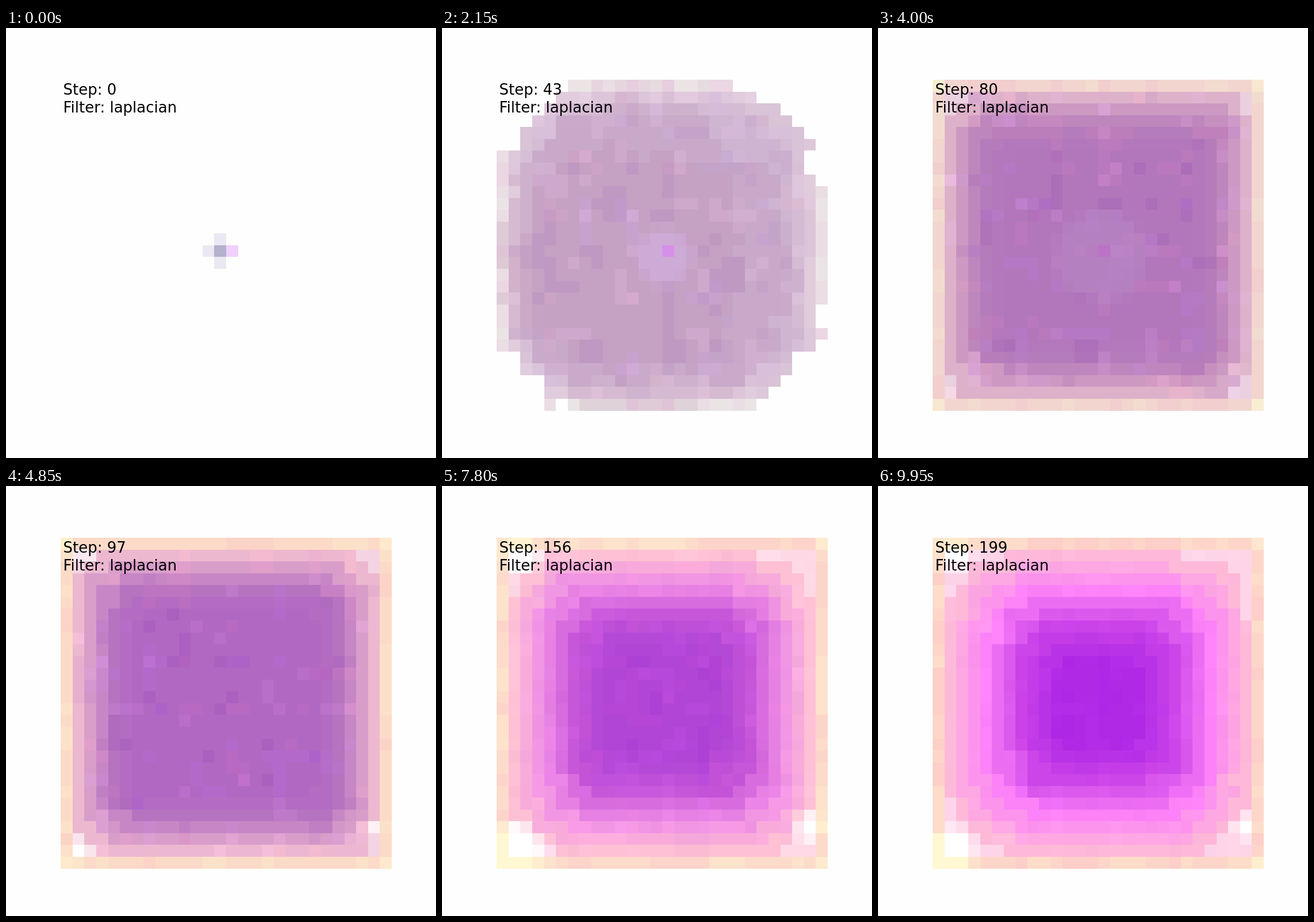
Recreate the animation shown at these times as an HTML page with a canvas. Size 748x748 px, loop 10000 ms.

```html
<!DOCTYPE html>
<html lang="en">
<head>
<meta charset="utf-8">
<title>Cellular growth</title>
<style>
  html, body { margin: 0; width: 100%; height: 100%; overflow: hidden; background: #fefefe; }
  canvas, svg { position: absolute; left: 0; top: 0; width: 748px; height: 748px; }
  text { font: 26px "DejaVu Sans", sans-serif; white-space: pre; }
</style>
</head>
<body>
<canvas id="stage" width="748" height="748"></canvas>
<svg viewBox="0 0 748 748">
  <text id="step" x="99.5" y="116">Step: 0</text>
  <text x="99.5" y="147">Filter: laplacian</text>
</svg>
<script>
const ctx = document.getElementById('stage').getContext('2d');
const label = document.getElementById('step');
const SIZE = 28, LAST = SIZE - 1, MID = LAST / 2;
const STEPS = 200, STEP_MS = 50, CELL = 575.5 / SIZE;

const rgb = hex => [1, 3, 5].map(i => parseInt(hex.slice(i, i + 2), 16));
const clamp = (v, lo = 0, hi = 1) => Math.max(lo, Math.min(hi, v));
const lerp = (a, b, k) => a + (b - a) * k;
const mix = (a, b, k) => a.map((v, i) => lerp(v, b[i], k));
const shift = (c, d, k) => c.map((v, i) => v + d[i] * k);
const ease = (from, to, s) => clamp((s - from) / (to - from));
const onEdge = v => v === 0 || v === LAST;

function gradient(list, at) {
  const v = clamp(at, 0, list.length - 1), i = Math.min(Math.floor(v), list.length - 2);
  return mix(list[i], list[i + 1], v - i);
}

// p: squareness of the rings, gap: rings between two colours, amp: grain.
const stage = (at, p, gap, amp, edge, ...rings) =>
  ({ at, p, gap, amp, edge: rgb(edge), rings: rings.map(rgb) });
const stages = [
  stage(64, 8, 1, .8, '#e8d1d6', '#d0abc5', '#bf95b9', '#b486b5', '#b384b5'),
  stage(97, 8, 1.5, .65, '#fcdac8', '#ecb8cf', '#cf90c8', '#b673c0', '#b168c2'),
  stage(122, 5.6, 2, .45, '#fde0c8', '#fdc4d0', '#d787d0', '#bf67cc', '#b05acb'),
  stage(156, 5, 2.5, .35, '#fddbcb', '#fec0d4', '#ee8ce5', '#c757d9', '#b145d6'),
  stage(199, 4.2, 3, .25, '#fdd6c9', '#feb9d9', '#fb82f7', '#cc45e9', '#b02ae5')
];
const young = ['#ede6ee', '#e5d8e6', '#d9c6da', '#d3b7d0'].map(rgb);
const spark = ['#f0d0ff', '#e9aeff', '#c069cc'].map(rgb);
const glow = ['#dfc7e6', '#b787c3'].map(rgb);
const seed = rgb('#b3b1cb'), bud = rgb('#ebe8f3');
const white = rgb('#ffffff'), cream = rgb('#fff8d2');

// Bleached corners and how wide they get.
const pockets = [{ x: 1, y: 26, r: 3.2 }, { x: 1.5, y: 1, r: 2.2 }, { x: 26, y: 24, r: 1.8 }];

function hash(x, y, z) {
  let h = Math.imul(x, 374761393) ^ Math.imul(y, 668265263) ^ Math.imul(z, 2147389327);
  h = Math.imul(h ^ (h >>> 13), 1274126177);
  h = Math.imul(h ^ (h >>> 15), 2246822519);
  return ((h ^ (h >>> 16)) >>> 0) / 2147483648 - 1;
}

// Smooth noise over the grid and time, in -1..1.
function noise(x, y, z) {
  const [i, j, k] = [x, y, z].map(Math.floor);
  const [u, v, w] = [x - i, y - j, z - k].map(f => f * f * (3 - 2 * f));
  const row = (b, c) => lerp(hash(i, b, c), hash(i + 1, b, c), u);
  const plane = c => lerp(row(j, c), row(j + 1, c), v);
  return lerp(plane(k), plane(k + 1), w);
}

function ringColour(st, x, y, n) {
  if (onEdge(x) || onEdge(y)) {
    return onEdge(x) && onEdge(y) ? mix(st.edge, cream, .5) : st.edge;
  }
  const dx = Math.abs(x - MID), dy = Math.abs(y - MID);
  const depth = Math.floor(14 - (dx ** st.p + dy ** st.p) ** (1 / st.p) + n * .35);
  return depth < 1 ? mix(st.rings[0], white, .4) : gradient(st.rings, (depth - 1) / st.gap);
}

function matureColour(x, y, s, n) {
  const i = Math.max(1, stages.findIndex(st => st.at >= s));
  const a = stages[i - 1], b = stages[i], k = ease(a.at, b.at, s);
  return {
    colour: mix(ringColour(a, x, y, n), ringColour(b, x, y, n), k),
    amp: lerp(a.amp, b.amp, k)
  };
}

// A dark core left of the seed spreads through the young tissue.
function youngLevel(x, y, s, age, n) {
  if (age < 5) return 0;
  const d = Math.hypot(x - 10.5, y - 15) + n * 1.8;
  return 1 + (d < (s - 13) * .46) + (d < (s - 17) * .38);
}

function grain(c, x, y, s, amp) {
  const a = noise(x / 1.4 + 40, y / 1.4, s / 22);
  const b = noise(x / 1.4, y / 1.4 + 70, s / 26);
  if (onEdge(x) || onEdge(y)) return shift(c, [0, 7, 1], Math.abs(a) > .3 ? Math.sign(a) : 0);
  if (a > .5) c = shift(c, [13, 10, 13], amp);
  else if (a < -.45) c = shift(c, [-9, -12, -3], amp);
  if (b > .55) c = shift(c, [3, 2, 12], amp);
  else if (b < -.55) c = shift(c, [11, 3, 1], amp);
  return c;
}

function bleach(c, x, y, s) {
  const size = ease(78, 122, s) * lerp(1, .75, ease(122, 199, s));
  const target = onEdge(x) || onEdge(y) ? cream : white;
  for (const p of pockets) {
    c = mix(c, target, clamp(p.r * size - Math.hypot(x - p.x, y - p.y)));
  }
  return c;
}

// The seed, its bright neighbour and the violet glow around them.
function light(c, x, y, s) {
  const fade = 1 - ease(72, 92, s);
  const d = Math.hypot(x - 13.7, y - 14.5);
  c = mix(c, gradient(glow, ease(27, 64, s)), clamp(1 + s / 24 - d) * ease(4, 24, s) * fade);
  if (y === 14 && x === 13) c = mix(c, seed, 1 - ease(0, 14, s));
  if (y === 14 && x === 14) c = mix(c, gradient(spark, s < 27 ? s / 27 : 1 + ease(27, 64, s)), fade);
  return c;
}

function cellColour(x, y, s) {
  const r = Math.hypot((x - 13) * 1.1, y - 14), first = r < 1.2;
  const birth = first ? 0 : Math.max(1, (r - 1) / .355 + noise(x / 1.3, y / 1.3, 5) * 3);
  if (s < birth) return null;

  const n = noise(x / 2 + 9, y / 2 + 9, s / 25);
  let { colour, amp } = matureColour(x, y, s, n);
  const grown = ease(27, 64, s);
  if (grown < 1) {
    const level = youngLevel(x, y, s, s - birth, n);
    const base = first ? mix(bud, young[level], ease(0, 6, s)) : young[level];
    colour = mix(base, colour, grown);
    amp = lerp(level * .2, amp, grown);
  }
  if (s) colour = grain(colour, x, y, s, amp);
  return light(bleach(colour, x, y, s), x, y, s);
}

const px = i => Math.round(95.3 + i * CELL);
const py = i => Math.round(90.1 + i * CELL);

function draw(s) {
  ctx.fillStyle = '#fefefe';
  ctx.fillRect(0, 0, 748, 748);
  for (let y = 0; y < SIZE; y++) {
    for (let x = 0; x < SIZE; x++) {
      const c = cellColour(x, y, s);
      if (!c) continue;
      ctx.fillStyle = `rgb(${c.map(v => Math.round(clamp(v, 0, 255)))})`;
      ctx.fillRect(px(x), py(y), px(x + 1) - px(x), py(y + 1) - py(y));
    }
  }
  label.textContent = 'Step: ' + s;
}

let shown = -1;
const start = performance.now();
function tick() {
  const s = Math.floor(Math.max(0, performance.now() - start) / STEP_MS) % STEPS;
  if (s !== shown) draw(shown = s);
  requestAnimationFrame(tick);
}
tick();
</script>
</body>
</html>
```
